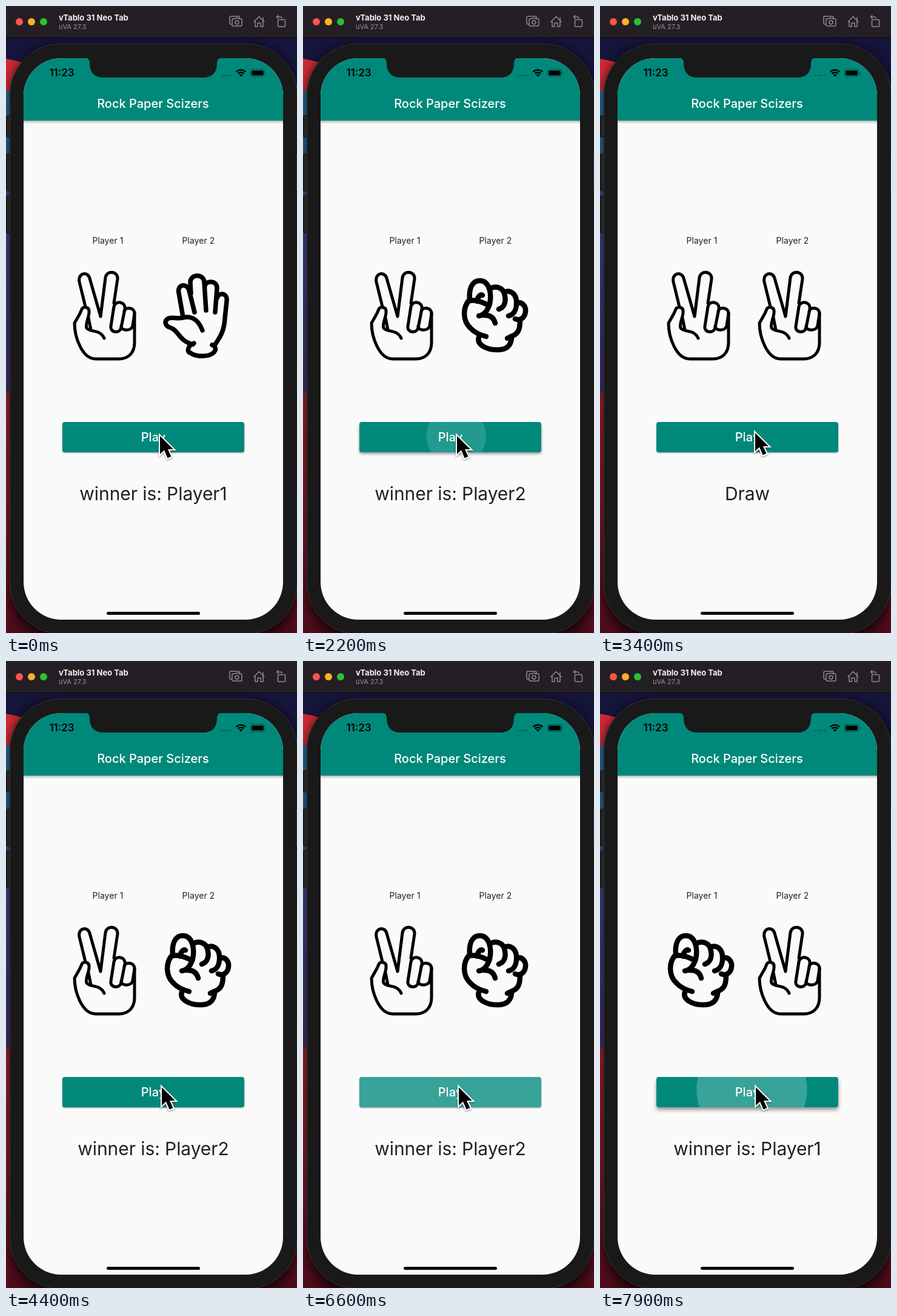
An HTML page that plays this animation: 480 by 1034 pixels, repeating every 8000 ms.

```html
<!DOCTYPE html>
<html lang="en">
<head>
<meta charset="utf-8">
<title>Hand game</title>
<style>
html, body { margin: 0; width: 100%; height: 100%; overflow: hidden; background: #1a1a1a; }
svg { display: block; width: 480px; height: 1034px; font-family: Inter, Roboto, sans-serif; }
.hand, .icon { fill: none; stroke: #000; stroke-linecap: round; stroke-linejoin: round; }
.icon { stroke: #8f8b90; stroke-width: 1.5; }
.mid { text-anchor: middle; }
</style>
</head>
<body>
<svg viewBox="0 0 480 1034">
  <defs>
    <linearGradient id="wall" x2="0" y2="1">
      <stop offset="0" stop-color="#14123a"/><stop offset=".13" stop-color="#1f6f98"/>
      <stop offset=".22" stop-color="#285f96"/><stop offset=".36" stop-color="#39458c"/>
      <stop offset=".615" stop-color="#432c6b"/><stop offset=".62" stop-color="#a01f2a"/>
      <stop offset=".8" stop-color="#85182a"/><stop offset="1" stop-color="#4b0c18"/>
    </linearGradient>
    <linearGradient id="barShade" x2="0" y2="1">
      <stop stop-opacity=".28"/><stop offset="1" stop-opacity="0"/>
    </linearGradient>
    <clipPath id="screen"><rect x="29" y="86" width="428" height="926" rx="62"/></clipPath>
    <clipPath id="face"><rect x="93" y="686" width="300" height="50" rx="4"/></clipPath>
    <filter id="soft" x="-10%" y="-50%" width="120%" height="200%"><feGaussianBlur id="blur" stdDeviation="1.5"/></filter>
    <filter id="halo"><feGaussianBlur stdDeviation="9"/></filter>
    <filter id="drop" x="-50%" y="-50%" width="200%" height="200%">
      <feDropShadow dx="0" dy="1.5" stdDeviation="1.5" flood-opacity=".4"/>
    </filter>

    <g id="scissors" class="hand" stroke-width="5">
      <path d="M131 496L121 455C118 440 135 437 138 449L156 512L164 448C166 435 185 437 184 450L178 490"/>
      <path d="M178 496C180 485 198 487 196 500L190 530C188 541 171 539 173 528Z"/>
      <path d="M195 504C197 495 213 497 212 508L209 527C207 537 190 536 190 528"/>
      <path d="M212 506V555C212 572 202 582 186 582H148C125 582 113 545 113 523L122 507L125 500C127 495 137 496 137 503C138 513 130 523 133 531C138 539 155 532 162 548M136 514L140 534"/>
    </g>
    <g id="rock" class="hand" stroke-width="8.500">
      <path d="M125 484C123 460 133 452 143 453C156 454 162 472 158 491C154 504 148 510 140 511M137 487C138 479 143 475 146 477"/>
      <path d="M159 466C167 461 179 464 182 474C186 488 182 497 173 500M182 472C193 467 201 476 202 486C203 500 198 509 189 511M203 490C212 487 218 496 217 504C216 514 208 520 200 516"/>
      <path d="M208 518C208 534 205 541 193 545L187 548M125 484C112 498 114 520 126 531C134 540 144 543 152 545M125 486C134 484 144 487 157 494M148 510C160 509 165 515 167 523"/>
      <path d="M140 546C136 558 152 567 170 567C188 567 193 558 194 548"/>
    </g>
    <g id="paper" class="hand" stroke-width="7.500">
      <g transform="translate(-150)">
        <path d="M292 513L285 473C282 459 298 456 302 469L311 505M305 474L304 456C304 441 327 441 327 456L330 502M328 462C329 452 349 452 348 466L345 505"/>
        <path d="M348 482C351 471 366 473 364 487L361 515C360 535 354 545 345 558"/>
        <path d="M292 514C283 516 275 513 268 515C259 520 264 528 270 530C286 535 284 552 308 558M292 514C307 510 318 519 324 535"/>
        <path d="M310 556C299 560 298 571 304 572C313 579 334 579 342 572C348 566 346 562 340 559"/>
      </g>
    </g>
  </defs>

  <!-- desktop and window bar -->
  <rect width="480" height="1034" fill="url(#wall)"/>
  <path d="M0 52H480V130H60L0 110Z" fill="#15143a"/>
  <path d="M0 87Q25 91 60 104L20 140H0Z" fill="#d02a35"/>
  <rect x="6" y="66" width="474" height="980" rx="80" filter="url(#halo)" fill-opacity=".7"/>
  <rect width="480" height="52" fill="#231f24"/>
  <path d="M0 52.500H480" stroke="#08070b"/>
  <circle cx="22" cy="26" r="6" fill="#ff544f"/>
  <circle cx="42" cy="26" r="6" fill="#fdb124"/>
  <circle cx="62" cy="26" r="6" fill="#28c231"/>
  <text x="87" y="24" font-size="13" font-weight="700" fill="#f2f0f2">vTablo 31 Neo Tab</text>
  <text x="87" y="38" font-size="11" fill="#97939a">uVA 27.3</text>
  <g class="icon">
    <path d="M372 30H371Q369 30 369 28V19Q369 17 371 17H383Q385 17 385 19V20"/>
    <path d="M375 21H378L379 20H383L384 21H387Q389 21 389 23V31Q389 33 387 33H375Q373 33 373 31V23Q373 21 375 21Z"/>
    <circle cx="381" cy="27" r="3"/>
    <path d="M409 26L417.500 17.500L426 26M411 25V34H415V28H420V34H424V25M424 19V23"/>
    <rect x="448.500" y="22.500" width="12" height="11.500" rx="1.500"/>
    <path d="M447 18H452Q455 18 455 20M449 15.500L446.500 18L449 20.500"/>
  </g>

  <!-- phone -->
  <g fill="#242424" stroke="#0a0a0a">
    <rect x=".5" y="181" width="9" height="35" rx="2"/>
    <rect x=".5" y="244" width="9" height="61" rx="2"/>
    <rect x=".5" y="313" width="9" height="61" rx="2"/>
  </g>
  <rect x="6.500" y="62.500" width="474" height="973" rx="84" fill="#191919" stroke="#333"/>
  <path d="M479.500 244V305" stroke="#303030"/>
  <g clip-path="url(#screen)">
    <rect x="29" y="86" width="428" height="926" fill="#fafafa"/>
    <rect x="29" y="189" width="428" height="5" fill="url(#barShade)"/>
    <rect x="29" y="86" width="428" height="103" fill="#00897b"/>
    <path d="M130 85Q138 86 138 94C138 110 146 118 162 118H324C340 118 348 110 348 94Q348 86 356 85Z" fill="#191919"/>
  </g>
  <text class="mid" x="92" y="116" font-size="17" font-weight="600">11:23</text>
  <path d="M355 114.500H373" stroke="#000" stroke-opacity=".3" stroke-width="3" stroke-linecap="round" stroke-dasharray="0 5.200"/>
  <g fill="none" stroke="#000" stroke-width="2.600">
    <path d="M379.500 108.500Q387.500 102 395.500 108.500M382.500 111.500Q387.500 107.500 392.500 111.500"/>
  </g>
  <path d="M384.500 113.500Q387.500 111.500 390.500 113.500L387.500 116.500Z"/>
  <rect x="403" y="104.500" width="24" height="12" rx="3.500" fill="none" stroke="#000" stroke-opacity=".4"/>
  <rect x="405" y="106.500" width="20" height="8" rx="2"/>
  <path d="M428.500 108.500Q430.500 110.500 428.500 112.500Z" fill-opacity=".5"/>
  <text class="mid" x="242.500" y="168" font-size="20" font-weight="500" fill="#fff">Rock Paper Scizers</text>
  <g class="mid" font-size="14" letter-spacing=".05" fill="#212121">
    <text x="168" y="392">Player 1</text>
    <text x="317.500" y="392">Player 2</text>
  </g>
  <use id="left"/>
  <use id="right" x="150"/>

  <rect id="shadow" x="93" width="300" height="49" rx="4" filter="url(#soft)"/>
  <rect x="93" y="686" width="300" height="50" rx="4" fill="#00897b"/>
  <g clip-path="url(#face)"><circle id="ripple" fill="#fff"/></g>
  <text class="mid" x="243" y="718" font-size="20" font-weight="500" fill="#fff">Play</text>
  <text id="result" class="mid" x="243" y="815" font-size="30" letter-spacing="-.08" fill="#212121"></text>
  <rect x="166" y="999" width="154" height="5" rx="2.500"/>
  <path id="cursor" d="M0 0V30L7 23.500L12.500 36.500L18.500 34L13 22H22Z" stroke="#fff" stroke-width="4" paint-order="stroke" filter="url(#drop)"/>
</svg>
<script>
const LOOP = 8000, STEP = 100;
const $ = id => document.getElementById(id);
const clamp = x => Math.max(0, Math.min(1, x));
const mix = (a, b, k) => a + (b - a) * k;
const set = (id, attrs) => { for (const k in attrs) $(id).setAttribute(k, attrs[k]); };

// press time, release time, then both hands and the verdict shown on release
const taps = [
  [-900, -800, 'scissors', 'paper', 'winner is: Player1'],
  [400, 500, 'rock', 'scissors', 'winner is: Player1'],
  [1400, 1500, 'scissors', 'rock', 'winner is: Player2'],
  [2152, 2270, 'scissors', 'scissors', 'Draw'],
  [3840, 3960, 'scissors', 'rock', 'winner is: Player2'],
  [5328, 5450, 'scissors', 'rock', 'winner is: Player2'],
  [6270, 6385, 'scissors', 'rock', 'winner is: Player2'],
  [7752, 7868, 'rock', 'scissors', 'winner is: Player1']
];
// time, x, y of the pointer tip
const track = [[0, 254, 709], [2500, 254, 709], [3100, 256, 704], [3500, 256, 704], [3800, 257, 703], [LOOP, 257, 703]];

// cubic-bezier(.25, .1, .25, 1)
function ease(x) {
  let lo = 0, hi = 1, u = .5;
  for (let i = 0; i < 20; i++) {
    u = (lo + hi) / 2;
    const at = .75 * u * (1 - u) + u ** 3;
    if (at < x) lo = u; else hi = u;
  }
  return .3 * u * (1 - u) ** 2 + 3 * u * u * (1 - u) + u ** 3;
}

function pointer(t) {
  const i = track.findIndex(p => p[0] > t);
  const [a, b] = [track[i - 1], track[i]];
  const k = (t - a[0]) / (b[0] - a[0]);
  return [mix(a[1], b[1], k), mix(a[2], b[2], k)];
}

function draw(t) {
  const [x, y] = pointer(t);
  set('cursor', { transform: `translate(${x} ${y})` });

  const shown = taps.filter(p => p[1] <= t).pop();
  set('left', { href: '#' + shown[2] });
  set('right', { href: '#' + shown[3] });
  $('result').textContent = shown[4];

  const [down, up] = taps.filter(p => p[0] <= t).pop();
  const held = Math.min(t, up) - down, free = Math.max(0, t - up);
  const grow = ease(clamp(held / 1000 + free / 225));
  const alpha = clamp((t - down) / 75) * (1 - clamp((free - 225) / 150));
  set('ripple', {
    cx: mix(x - 1, 243, grow), cy: mix(y, 711, grow),
    r: mix(46, 152, grow), 'fill-opacity': .22 * alpha
  });

  const lift = clamp(held / 90) * (1 - clamp((free - 50) / 150));
  set('shadow', { y: mix(688, 691, lift), 'fill-opacity': mix(.4, .42, lift) });
  set('blur', { stdDeviation: mix(1.3, 3, lift) });
}

const start = performance.now();
function tick() {
  const t = (performance.now() - start) % LOOP;
  draw(Math.floor(t / STEP) * STEP);
  requestAnimationFrame(tick);
}
tick();
</script>
</body>
</html>
```
